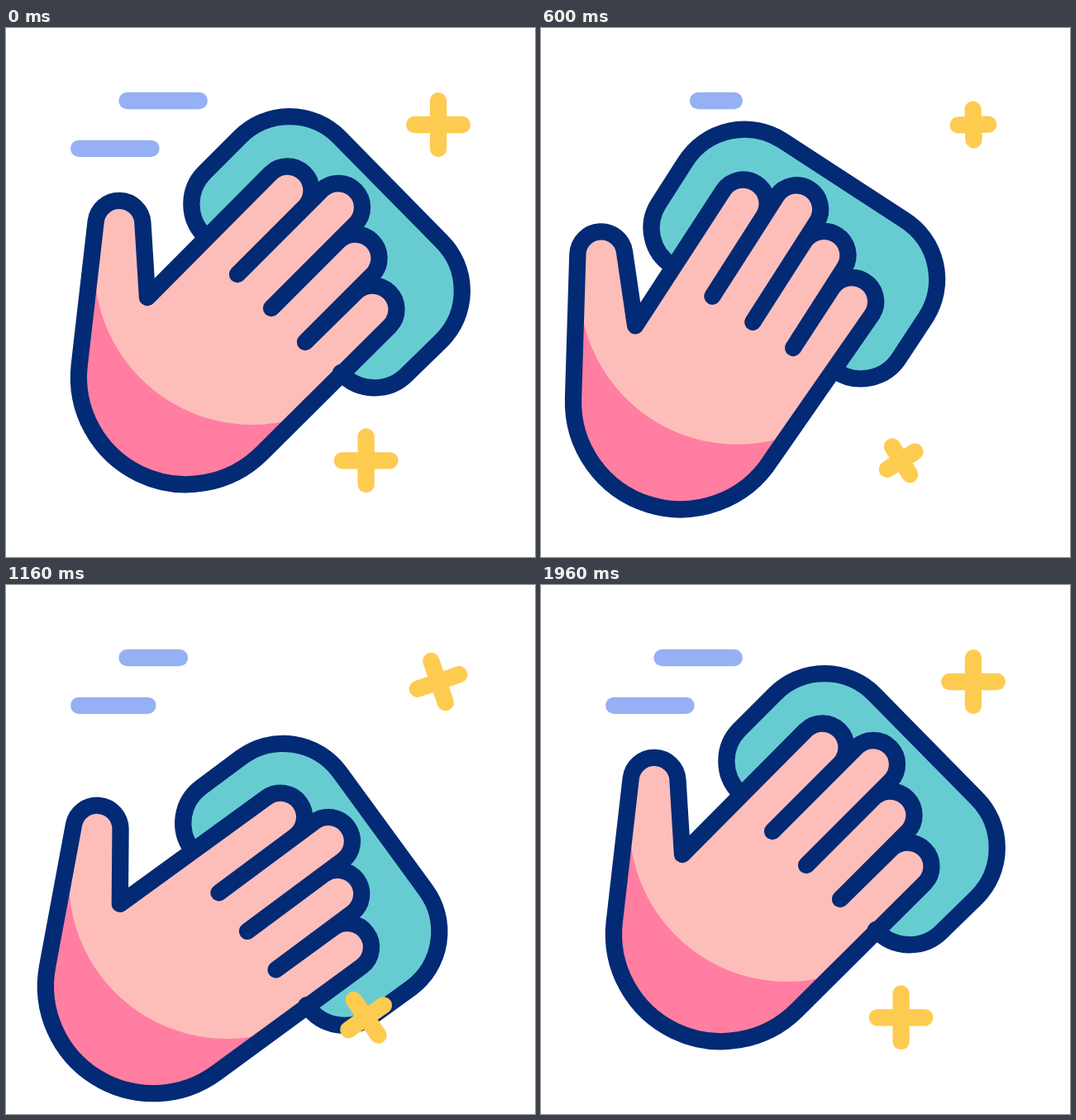
These frames come from a looping animation (640 px wide and 640 px high, 2000 ms). An HTML page with a canvas:

```html
<!DOCTYPE html>
<html lang="en">
<head>
<meta charset="utf-8">
<title>Wiping hand</title>
<style>
  html, body { margin: 0; width: 100%; height: 100%; overflow: hidden; background: #fff; }
  canvas { display: block; width: 100vw; height: 100vh; }
</style>
</head>
<body>
<canvas id="stage"></canvas>
<script>
const SIZE = 640, LOOP = 2000, STEP = 40, LINE = 20.3;
const NAVY = '#032a75', SKIN = '#fdbeba', PINK = '#ff7ea1';
const TEAL = '#67ccd1', YELLOW = '#fdcb50', BLUE = '#95b1f3';
const PALM = [218, 422];

const canvas = document.getElementById('stage');
const ctx = canvas.getContext('2d');
const scale = Math.max(1, window.devicePixelRatio || 1);
canvas.width = canvas.height = SIZE * scale;

// time, palm x, palm y, finger angle, thumb angle, finger shift x, finger shift y
const poses = [
  [0, 218, 422, 0, 0, 0, 0],
  [200, 214, 422.8, -2.8, -1.2, 0.6, 1.4],
  [400, 197, 428.5, -8.2, -3.6, 2.4, 5],
  [600, 169, 452, -12.4, -4.8, 4.5, 7],
  [760, 158.5, 465.5, -11.6, -4.1, 3.4, 7],
  [920, 164, 475.5, -5.4, -1.3, 1.4, 5.6],
  [1160, 178, 485, 8.4, 4, 0, 0.9],
  [1320, 192.5, 469, 9, 4, 0, 0.8],
  [1480, 206, 450.3, 7.6, 3, 0, 0.7],
  [1720, 216, 425.8, 2, 0.8, 0, 0],
  [1960, 218, 422, 0, 0, 0, 0],
  [2000, 218, 422, 0, 0, 0, 0]
];

const sponge = new Path2D(
  'M240 251A54 54 0 0 1 240 175L283 132A85 85 0 0 1 403 132' +
  'L527 258A85 85 0 0 1 527 378L485 419A55 55 0 0 1 405 417');

const tips = [[341, 196], [402.5, 216.5], [423, 278], [444, 340]];
const valleys = [[280, 298], [321, 339], [362, 380]];

const clamp = v => Math.min(1, Math.max(0, v));
const rad = deg => deg * Math.PI / 180;

// Smooth curve through the poses, at rest at both ends
function poseAt(t) {
  let i = 0;
  while (i < poses.length - 2 && t >= poses[i + 1][0]) i++;
  const p = poses[i], q = poses[i + 1];
  const span = q[0] - p[0], u = (t - p[0]) / span;
  const slope = (k, c) => {
    const before = poses[k - 1], after = poses[k + 1];
    return before && after ? (after[c] - before[c]) / (after[0] - before[0]) : 0;
  };
  const [x, y, a, b, dx, dy] = [1, 2, 3, 4, 5, 6].map(c => {
    const v = 1 - u;
    return p[c] * (1 + 2 * u) * v * v + q[c] * u * u * (3 - 2 * u) +
      span * u * v * (slope(i, c) * v - slope(i + 1, c) * u);
  });
  return { x, y, a: rad(a), b: rad(b), dx, dy };
}

function mover(x, y, angle) {
  const c = Math.cos(angle), s = Math.sin(angle);
  return (px, py) => {
    const u = px - PALM[0], v = py - PALM[1];
    return (x + u * c - v * s).toFixed(2) + ' ' + (y + u * s + v * c).toFixed(2);
  };
}

function handPath(pose) {
  const finger = mover(pose.x + pose.dx, pose.y + pose.dy, pose.a);
  const heel = mover(pose.x, pose.y, pose.a);
  const thumb = mover(pose.x, pose.y, pose.b);
  const arc = (r, end) => `A${r} ${r} 0 0 1 ${end}`;
  let d = 'M' + thumb(171, 326);
  tips.forEach(([x, y], i) => {
    d += 'L' + finger(x - 20.5, y - 20.5) + arc(29, finger(x + 20.5, y + 20.5));
    if (valleys[i]) d += 'L' + finger(...valleys[i]);
  });
  d += 'L' + heel(310, 514) + arc(130, thumb(88.8, 407.3));
  d += 'L' + thumb(108.7, 233.8) + arc(28.5, thumb(165.4, 235.3)) + 'Z';
  return new Path2D(d);
}

function inSpongeSpace(pose, paint) {
  ctx.save();
  ctx.translate(pose.x + pose.dx, pose.y + pose.dy);
  ctx.rotate(pose.a);
  ctx.translate(-PALM[0], -PALM[1]);
  paint();
  ctx.restore();
}

function drawHand(pose) {
  const hand = handPath(pose);
  inSpongeSpace(pose, () => {
    ctx.fillStyle = TEAL;
    ctx.fill(sponge);
  });

  ctx.fillStyle = PINK;
  ctx.fill(hand);
  ctx.save();
  ctx.clip(hand);
  ctx.translate(pose.x, pose.y);
  ctx.rotate(pose.b);
  ctx.fillStyle = SKIN;
  ctx.beginPath();
  ctx.arc(80, -133, 191, 0, 2 * Math.PI);
  ctx.fill();
  ctx.restore();

  ctx.strokeStyle = NAVY;
  ctx.stroke(hand);
  inSpongeSpace(pose, () => ctx.stroke(sponge));
}

function segment(x1, y1, x2, y2) {
  ctx.beginPath();
  ctx.moveTo(x1, y1);
  ctx.lineTo(x2, y2);
  ctx.stroke();
}

// Wipes away from the left, then grows back from the left
function drawBar(x, y, t, start) {
  const length = 87.3, run = 555, total = 1360;
  const from = clamp((t - start) / run) ** 3;
  const to = 1 - clamp((start + total - t) / run) ** 3;
  ctx.strokeStyle = BLUE;
  if (from < 1) segment(x + length * from, y, x + length, y);
  else if (to > 0) segment(x, y, x + length * to, y);
}

// One full eased turn while the arms shorten and return
function drawSparkle(x, y, t, start, middle) {
  const u = clamp((t - start) / 1520);
  const turn = u < 0.5 ? 4 * u ** 3 : 1 - 4 * (1 - u) ** 3;
  const arm = 28.8 - 20 * clamp(1 - Math.abs(t - middle) / 780) ** 3;
  ctx.save();
  ctx.translate(x, y);
  ctx.rotate(turn * 2 * Math.PI);
  ctx.strokeStyle = YELLOW;
  segment(-arm, 0, arm, 0);
  segment(0, -arm, 0, arm);
  ctx.restore();
}

function draw(t) {
  ctx.setTransform(scale, 0, 0, scale, 0, 0);
  ctx.fillStyle = '#fff';
  ctx.fillRect(0, 0, SIZE, SIZE);
  ctx.lineWidth = LINE;
  ctx.lineCap = ctx.lineJoin = 'round';
  drawBar(146.5, 88, t, 160);
  drawBar(88.2, 145.8, t, 0);
  drawHand(poseAt(t));
  drawSparkle(523, 117, t, 0, 750);
  drawSparkle(435.6, 523.3, t, 80, 785);
}

const begin = performance.now();
function frame() {
  const t = (performance.now() - begin) % LOOP;
  draw(Math.floor(t / STEP) * STEP);
  requestAnimationFrame(frame);
}
frame();
</script>
</body>
</html>
```
